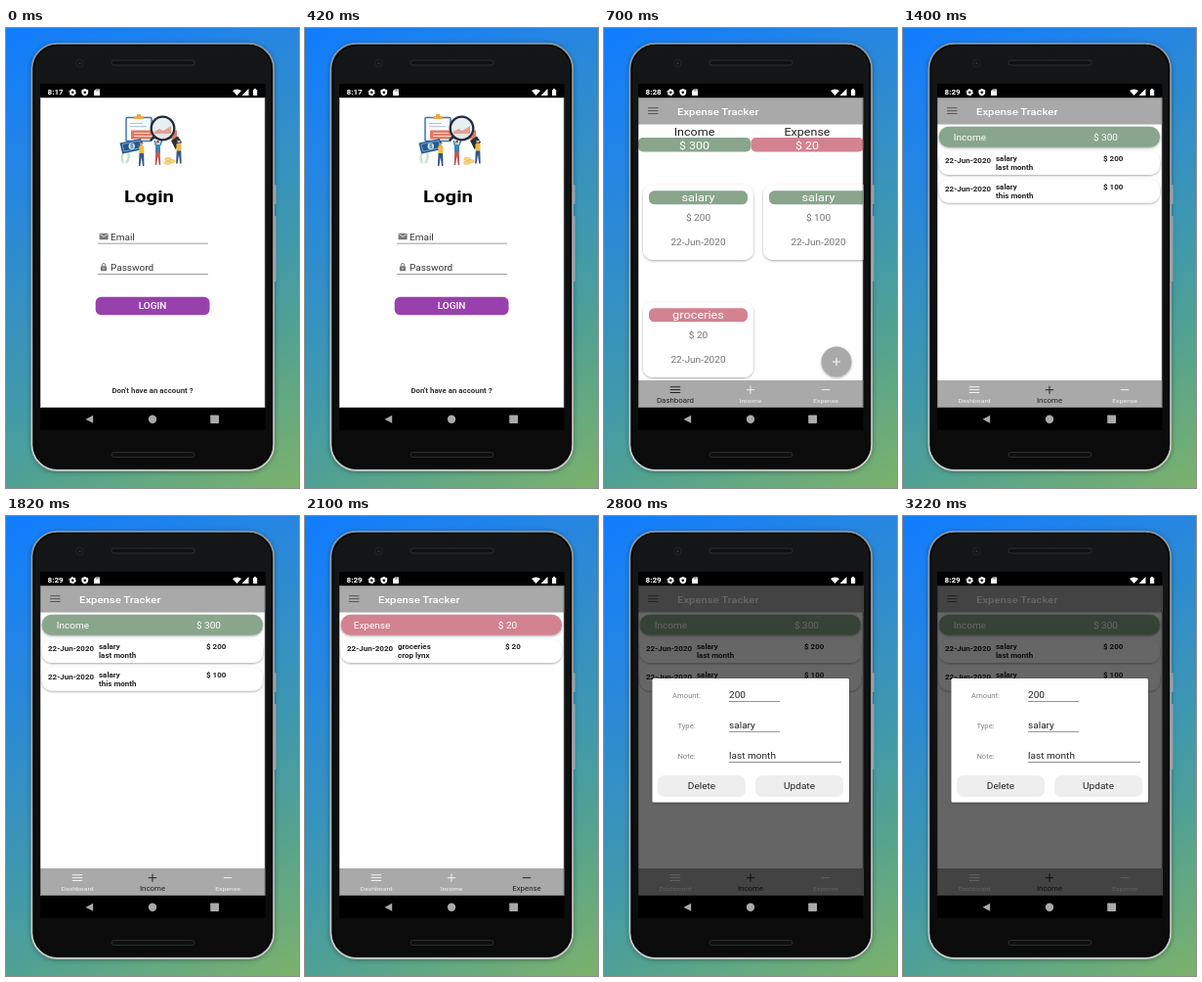
These frames come from a looping animation (300 px wide and 470 px high, 3500 ms). An HTML page:

```html
<!DOCTYPE html>
<html lang="en">
<head>
<meta charset="utf-8">
<title>Expense app tour</title>
<style>
  html, body { margin: 0; width: 100%; height: 100%; overflow: hidden; }
  body { background: #3c95b4; }
  svg { display: block; width: 300px; height: 470px; font-family: Roboto, sans-serif; }
  .scene { display: none; }
  .scene.on { display: inline; }
</style>
</head>
<body>
<svg id="stage" viewBox="0 0 300 470"></svg>
<script>
const SCENE_MS = 700;
const TYPE_SCALE = '1.16 .96'; // the handset is shown wider than its 9:16 screen
const GREY = '#a9a9a9', GREEN = '#89a58b', PINK = '#d28291', INK = '#222', SOFT_WHITE = '#f2f2f2';

const text = (x, y, str, size, fill = INK, weight = 400, anchor = 'middle') =>
  `<text transform="translate(${x} ${y}) scale(${TYPE_SCALE})" font-size="${size}" fill="${fill}" font-weight="${weight}" text-anchor="${anchor}">${str}</text>`;
const left = (x, y, str, size, fill, weight) => text(x, y, str, size, fill, weight, 'start');
const box = (x, y, w, h, r, fill, extra = '') =>
  `<rect x="${x}" y="${y}" width="${w}" height="${h}" rx="${r}" fill="${fill}" ${extra}/>`;
const path = (d, fill, extra = '') => `<path d="${d}" fill="${fill}" ${extra}/>`;
const line = (d, color, width = 1) => path(d, 'none', `stroke="${color}" stroke-width="${width}"`);
const disc = (x, y, r, fill, extra = '') => `<circle cx="${x}" cy="${y}" r="${r}" fill="${fill}" ${extra}/>`;
const page = (fill, extra) => box(35, 71, 230.5, 317, 0, fill, extra);
const SHADOW = 'filter="url(#shadow)"';

const plus = (x, y, r, color) => line(`M${x - r} ${y}h${2 * r}M${x} ${y - r}v${2 * r}`, color);
const menu = (x, y, color) => line(`M${x} ${y}h10.5m-10.5 2.9h10.5m-10.5 2.9h10.5`, color);

function phone() {
  const slot = y => box(108, y, 85, 5, 2.5, '#101010', 'stroke="#333638" stroke-width=".8"');
  return box(0, 0, 300, 470, 0, 'url(#sky)') +
    box(272, 160, 4.5, 20, 1, '#b4bcbf') + box(272, 192, 4.5, 67, 1, '#b4bcbf') +
    box(26.5, 15.8, 247.6, 436, 26, '#0d0e0f', 'stroke="url(#rim)" stroke-width="1.8" filter="url(#halo)"') +
    box(28.4, 17.7, 243.8, 432.2, 24.2, 'url(#glass)', 'stroke="#060606" stroke-width="1.4"') +
    slot(33) + slot(433.5) +
    disc(75.5, 36, 3.7, '#111417', 'stroke="#292c2e" stroke-width=".8"') + disc(75.5, 36, 1.2, '#25313b') +
    box(35, 57, 230.5, 354, 0, '#000');
}

function systemBars(time) {
  return left(42.5, 68.4, time, 7, '#fff', 700) +
    disc(68.2, 65.7, 2.1, 'none', 'stroke="#fff" stroke-width="1.7"') +
    disc(68.2, 65.7, 3.3, 'none', 'stroke="#fff" stroke-width="1" stroke-dasharray="1.7 1.75"') +
    path('M80.8 62.1l3.4 1.3v2.3q0 2.5-3.4 3.8q-3.4-1.3-3.4-3.8v-2.3z', '#fff') + disc(80.8, 65.7, 1.3, '#000') +
    path('M90 64.2l2-1.8h4v6.6h-6z', '#fff') + line('M92.2 63.2v1.4m1.4-1.4v1.4m1.4-1.4v1.4', '#000', .5) +
    path('M232 64q4.5-3 9 0l-4.5 5z', '#fff') + path('M248.5 62v7h-7z', '#fff') +
    path('M253 62.9h1v-.9h2v.9h1.2v6.2h-4.2z', '#fff') +
    path('M81.5 399.8l7.7-4v8z', GREY) + disc(150, 399.8, 4.2, GREY) + box(209.2, 395.6, 8.8, 8.4, .7, GREY) +
    box(35, 71, 230.5, 317, 0, 'none', 'stroke="#000" stroke-opacity=".25" stroke-width="2"');
}

function appBar() {
  return box(35, 71, 230.5, 27.5, 0, GREY) + menu(45, 81.7, '#555') +
    left(75, 88.5, 'Expense Tracker', 9.75, '#fff', 500);
}

function tabBar(active) {
  return box(35, 360, 230.5, 28, 0, GREY) + ['Dashboard', 'Income', 'Expense'].map((label, i) => {
    const x = 73 + 77 * i, on = i === active, color = on ? INK : SOFT_WHITE;
    const icon = [menu(x - 5.3, 366.7, color), plus(x, 369.7, 4.2, color), line(`M${x - 4.2} 369.7h8.4`, color)][i];
    return icon + text(x, 382.7, label, on ? 6.8 : 5.9, color);
  }).join('');
}

function illustration() {
  const person = (x, y, shirt, legs) =>
    disc(x, y, 1.7, '#e8ac85') + path(`M${x - 1.8} ${y - .6}q1.8-3 3.6 0z`, '#29324a') +
    box(x - 2.5, y + 2, 5, 9, 1.8, shirt) +
    path(`M${x - 2.3} ${y + 10}h4.6l.4 13h-1.5l-1.2-9l-1.4 9h-1.5z`, legs);
  const coin = (x, y) =>
    `<ellipse cx="${x}" cy="${y}" rx="3.3" ry="1.7" fill="#f6d77e" stroke="#e5a83f" stroke-width=".5"/>`;
  return box(123, 91.5, 26, 24, 1, '#f8fbfd', 'stroke="#3e74b0" stroke-width="1.5"') +
    path('M131 93v-2.7h3v-2.2h4v2.2h3v2.7z', '#eda849') +
    line('M127 97.5h13m-13 3.2h17', '#a9c3d8') +
    box(128, 104.5, 47, 9, 0, '#e07a66') + line('M131 107.5h16m-16 3h40', '#f7d9cd') +
    line('M120 138q-3-6 1-13m2 13q4-4 2-12', '#c5e3cb', 2.4) +
    path('M116.5 117.5l21.5-4.5l2.2 11l-21 4.5z', '#28588f') +
    path('M119 118.7l17.8-3.7l1.4 7.4l-17.5 3.7z', 'none', 'stroke="#8fc0e2" stroke-width=".7"') +
    disc(128.7, 120.7, 3.2, '#d7ebf6') + text(128.7, 122.8, '$', 5.5, '#28588f', 700) +
    coin(166, 134) + coin(170, 136.2) + coin(165.5, 137.8) +
    person(138.8, 118, '#f2bd45', '#34558b') + person(155.5, 117, '#3686ba', '#c0584f') +
    line('M153.5 120l-1.2-5m5.5 5l2-6', '#3686ba', 1.6) +
    disc(160.5, 102.5, 11.8, '#e6eef2', 'fill-opacity=".9" stroke="#222c37" stroke-width="2.3"') +
    path('M152 106l5-3l4 2l8-5v8h-17z', '#e3a195') + line('M151.6 111l-3.6 4', '#222c37', 2.6) +
    path('M169 115l7-4.5l4 6.2l-6.5 7.3z', '#26313e') + person(177, 115.5, '#efba44', '#315888');
}

function login() {
  const field = (y, label) => left(107, y, label, 8.65, '#333') + line(`M94 ${y + 3.7}h113`, '#888', .8);
  return page('#fff') + illustration() +
    text(146.5, 178.3, 'Login', 17.5, '#000', 700) +
    box(95.6, 209.8, 9, 6.4, .7, '#777') + line('M96.3 210.7l3.8 2.6l3.8-2.6', '#fff', .8) +
    box(96.9, 243.2, 6.2, 5, .7, '#777') + line('M98.4 243.2v-1.2a1.6 1.6 0 0 1 3.2 0v1.2', '#777', .9) +
    disc(100, 245.7, .7, '#fff') +
    field(216.5, 'Email') + field(247.8, 'Password') +
    box(91.7, 274.8, 116.8, 18.4, 5.5, '#9841ad') + text(150, 287.1, 'LOGIN', 8.6, '#fff', 500) +
    text(150, 373, "Don't have an account ?", 6.8, '#333', 700);
}

function dashboard() {
  const total = (x, label, amount, color) => text(x + 57.5, 109.6, label, 10.8) +
    box(x, 112, 115.3, 14.4, 5, color) + text(x + 57.5, 123.6, amount, 10.8, '#fff');
  const card = (x, y, kind, amount, color) => box(x, y, 113, 77, 10, '#fff', SHADOW) +
    box(x + 6, y + 6.3, 101, 14, 5.5, color) + text(x + 56.5, y + 17.2, kind, 11, '#fff') +
    text(x + 56.5, y + 36.8, amount, 8.7, '#737373') + text(x + 56.5, y + 62.3, '22-Jun-2020', 8.7, '#737373');
  return page('#fefefe') + appBar() +
    total(35, 'Income', '$ 300', GREEN) + total(150.5, 'Expense', '$ 20', PINK) +
    card(40, 160, 'salary', '$ 200', GREEN) + card(163, 160, 'salary', '$ 100', GREEN) +
    card(40, 280, 'groceries', '$ 20', PINK) +
    disc(238, 341, 15.5, GREY, SHADOW) + plus(238, 341, 4, '#fff') + tabBar(0);
}

function ledger(tab, title, total, color, entries) {
  const pill = (y, h, fill) => box(36.7, y, 226.3, h, 10, fill, SHADOW);
  const rows = entries.map(([kind, note, amount], i) => {
    const y = 126.2 + 28.4 * i;
    const bold = (x, dy, str) => left(x, y + dy, str, 6.9, INK, 700);
    return pill(y, 23.8, '#fff') + bold(43, 12.1, '22-Jun-2020') +
      bold(95, 10, kind) + bold(95, 19, note) + bold(205, 10, amount);
  }).join('');
  return page('#fefefe') + appBar() + pill(100.8, 21, color) +
    text(68.5, 114.7, title, 8.65, '#fff') + text(207.5, 114.7, total, 8.65, '#fff') + rows + tabBar(tab);
}

const income = () => ledger(1, 'Income', '$ 300', GREEN,
  [['salary', 'last month', '$ 200'], ['salary', 'this month', '$ 100']]);
const expense = () => ledger(2, 'Expense', '$ 20', PINK, [['groceries', 'crop lynx', '$ 20']]);

function editDialog() {
  const field = (y, label, value, width) => text(84.5, y, label, 6.6, '#858585') +
    left(128, y, value, 8.7) + line(`M128 ${y + 3.9}h${width}`, '#777', .8);
  const button = (x, label) => box(x, 265, 90, 22, 7, '#eee') + text(x + 45, 279.4, label, 8.7);
  return income() + page('#000', 'fill-opacity=".6"') +
    box(49.5, 166, 201.5, 126.5, 1.5, '#fff', SHADOW) +
    field(185.6, 'Amount:', '200', 52) + field(216.5, 'Type:', 'salary', 52) +
    field(247.6, 'Note:', 'last month', 115) + button(55, 'Delete') + button(155, 'Update');
}

const scenes = [['8:17', login], ['8:28', dashboard], ['8:29', income], ['8:29', expense], ['8:29', editDialog]];
const stage = document.getElementById('stage');
stage.innerHTML = `<defs>
  <linearGradient id="sky" gradientUnits="userSpaceOnUse" x1="20" y1="0" x2="290" y2="470">
    <stop stop-color="#127dfd"/><stop offset=".25" stop-color="#2686e0"/><stop offset=".6" stop-color="#4099ab"/>
    <stop offset=".75" stop-color="#52a291"/><stop offset="1" stop-color="#7bb16c"/>
  </linearGradient>
  <linearGradient id="rim" x2="0" y2="1">
    <stop stop-color="#8b979d"/><stop offset=".5" stop-color="#a3abae"/><stop offset="1" stop-color="#c9cccd"/>
  </linearGradient>
  <linearGradient id="glass" x2="0" y2="1"><stop stop-color="#151617"/><stop offset="1" stop-color="#0b0b0c"/></linearGradient>
  <filter id="shadow" x="-20%" y="-30%" width="140%" height="160%">
    <feDropShadow dx="0" dy="1" stdDeviation="1.2" flood-opacity=".35"/>
  </filter>
  <filter id="halo"><feDropShadow dx="0" dy="1" stdDeviation="2.5" flood-opacity=".35"/></filter>
  <clipPath id="screen"><rect x="35" y="57" width="230.5" height="354"/></clipPath>
</defs>` + phone() + scenes.map(([time, draw]) =>
  `<g class="scene" clip-path="url(#screen)">${draw()}${systemBars(time)}</g>`).join('');

const groups = stage.querySelectorAll('.scene');
function render() {
  const current = Math.floor(performance.now() / SCENE_MS) % scenes.length;
  groups.forEach((group, i) => group.classList.toggle('on', i === current));
  requestAnimationFrame(render);
}
render();
</script>
</body>
</html>
```
